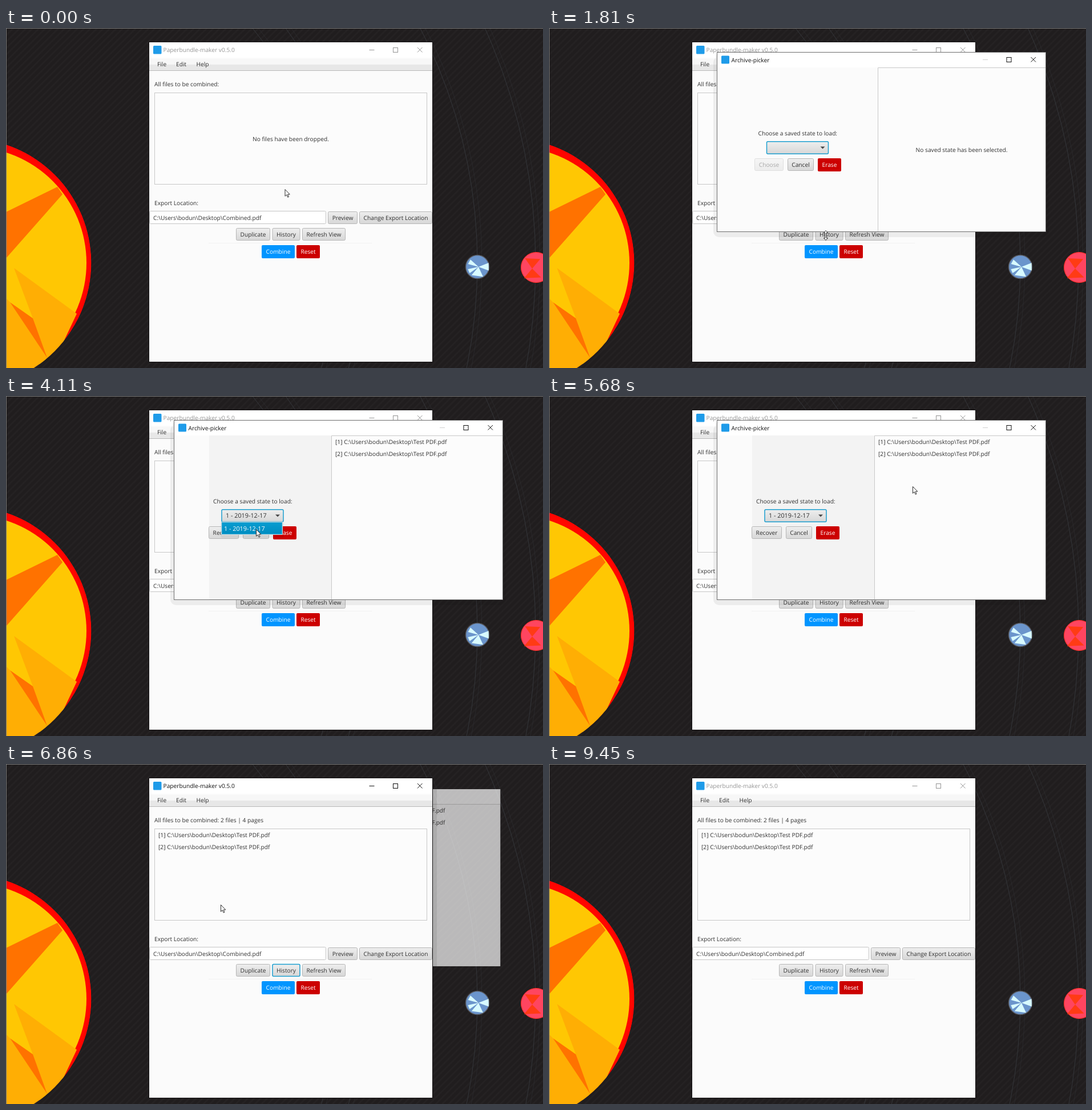
Animation of 941x595 px, one loop 9.55 s. Source, as an HTML page:

```html
<!DOCTYPE html>
<html lang="en">
<head>
<meta charset="utf-8">
<title>File bundling demo</title>
<style>
html, body { margin: 0; width: 100%; height: 100%; overflow: hidden; background: #211e1f; }
svg { display: block; width: 941px; height: 595px; }
text { font: 10.2px "Open Sans", "Noto Sans", sans-serif; fill: #303030; white-space: pre; text-rendering: geometricPrecision; }
.date { font-size: 10.8px; }
.mid { text-anchor: middle; }
.light text { fill: #fff; }
.off { opacity: .4; }
.btn rect { fill: url(#face); stroke: #b6b6b6; }
.btn.hover rect { fill: url(#bright); }
.btn.focus rect { stroke: #1c9fd0; stroke-width: 1.5; }
.list { fill: #fcfcfc; stroke: #c8c8c8; }
.glyph { fill: none; stroke: currentColor; }
.frame { fill: #fbfbfb; stroke: #6d6d6d; }
.fading .frame { stroke: none; }
</style>
</head>
<body>
<svg id="stage" viewBox="0 0 941 595"></svg>
<script>
const LOOP = 9550;
const USER = String.raw`C:\Users\bodun\Desktop` + '\\';
const DATE = '1 - 2019-12-17';
const BLUE = '#0095ff', RED = '#cc0000';

const pen = document.createElement('canvas').getContext('2d');
pen.font = '10.2px "Open Sans", "Noto Sans", sans-serif';

const text = (x, y, s, attrs = '') => `<text x="${x}" y="${y}" ${attrs}>${s}</text>`;
const mid = (x, y, s) => text(x, y, s, 'class="mid"');
const box = (x, y, w, h, attrs = '') => `<rect x="${x}" y="${y}" width="${w}" height="${h}" ${attrs}/>`;
const poly = (points, fill) => `<polygon points="${points}" fill="${fill}"/>`;
const disc = (x, y, r, attrs = '') => `<circle cx="${x}" cy="${y}" r="${r}" ${attrs}/>`;
const orbit = r => disc(-71, 412, r);

// A centred row of buttons, each as wide as its label plus padding
function row(cx, y, gap, items) {
  const widths = items.map(b => Math.round(pen.measureText(b.label).width + 15));
  let x = Math.round(cx - (widths.reduce((a, b) => a + b) + gap * (items.length - 1)) / 2);
  return items.map(({ label, fill, id, cls = '' }, i) => {
    const w = widths[i], left = x;
    x += w + gap;
    const name = id ? `id="${id}"` : '';
    return fill
      ? `<g class="light">${box(left, y, w, 23, `rx="2" fill="${fill}"`)}${mid(left + w / 2, y + 14.9, label)}</g>`
      : `<g class="btn ${cls}" ${name}>${box(left + .5, y + .5, w - 1, 21, 'rx="2"')}${mid(left + w / 2, y + 14.7, label)}</g>`;
  }).join('');
}

const fileRows = (x, y) => [1, 2].map(n =>
  text(x, y + (n - 1) * 20.8, `[${n}] ${USER}Test PDF.pdf`)).join('');

const winGlyphs = (x, y, minColor = 'currentColor') => `<g class="glyph">
  <path d="M${x - 4.5} ${y + .5}h9" stroke="${minColor}"/>${box(x + 37.5, y - 3.5, 8, 8)}
  <path d="M${x + 80} ${y - 4}l8.5 8.5m0-8.5l-8.5 8.5"/></g>`;

const logo = (x, y, size) => box(x, y, size, size, 'rx="1.5" fill="#1e9be9"');

// Left half of the dialog is centred on cx, the list starts at edge
const chooser = (cx, edge, value, list, buttons) => `
  <path d="M${edge + .5} 356V69.5H870" class="list"/>${box(edge + 1, 70, 869 - edge, 286, 'fill="#fcfcfc"')}${list}
  ${mid(cx + .3, 187.5, 'Choose a saved state to load:')}
  ${box(cx - 54, 198.7, 108, 21.6, 'rx="2" fill="url(#face)" stroke="#1c9fd0" stroke-width="1.5"')}
  <path d="M${cx + 40} 207.5h8l-4 4z" fill="#444"/>${text(cx - 47, 213, value, 'class="date"')}
  ${row(cx, 228, 7, buttons)}`;

// Pale wedges of a planet, from an inner point to the rim, in degrees
const wedges = (x, y, r, fill, ...spans) => spans.map(([from, to]) =>
  poly([[x, y], ...[from, to].map(a => a * Math.PI / 180)
    .map(a => [x + r * Math.cos(a), y + r * Math.sin(a)])].join(' '), fill)).join('');

const gradient = (id, ...colors) => `<linearGradient id="${id}" x2="0" y2="1">${colors.map((c, i) =>
  `<stop offset="${i / (colors.length - 1)}" stop-color="${c}"/>`).join('')}</linearGradient>`;

const defs = `<defs>
  ${gradient('face', '#eeeeee', '#d7d7d7')}${gradient('bright', '#f8f8f8', '#e4e4e4')}${gradient('pick', '#079cd0', '#008cc0')}
  <pattern id="stripes" width="8" height="8" patternUnits="userSpaceOnUse" patternTransform="rotate(45)">
    ${box(0, 0, 8, 8, 'fill="#201d1e"')}${box(0, 0, 2.5, 8, 'fill="#252223"')}</pattern>
  <clipPath id="sunEdge">${disc(-68.5, 411, 218)}</clipPath>
  <clipPath id="besideMain">${box(748, 0, 193, 595)}</clipPath>
</defs>`;

const backdrop = `${box(0, 0, 941, 595, 'fill="url(#stripes)"')}
<g fill="none" stroke="#34363a">${[650, 696, 897, 999].map(r => orbit(r) + `<g opacity=".45">${orbit(r + 8)}</g>`).join('')}</g>
<g clip-path="url(#sunEdge)">
  ${disc(-68.5, 411, 218, 'fill="#ff0500"')}${disc(-62, 411, 203, 'fill="#ffc703"')}
  ${poly('0,322 90,278 99,291 0,403', '#ff7200')}
  ${poly('14,420 124,500 99,553 60,595 47,508', '#ffae04')}
  ${poly('0,473 7,480 72,577 52,600 0,600', '#ffae04')}
  ${poly('7,480 47,508 72,577', '#ff7200')}
</g>
${disc(826, 418, 20.5, 'fill="#6b95cc" stroke="#56575c" stroke-width="1.5"')}
${wedges(828, 418, 19, '#d8faff', [195, 222], [-22, 20], [145, 168], [65, 130])}
${disc(929, 419, 26.5, 'fill="#ff4560" stroke="#ff2c20"')}
${wedges(922, 421, 22, '#ff3b14', [45, 130], [235, 310])}
<path d="M0 .5H941M.5 0V595" stroke="#777"/>`;

const mainWin = `${box(250, 24, 498, 561, 'fill="#151314"')}
${box(251, 25, 496, 559, 'fill="#fbfbfb"')}${box(251, 25, 496, 27, 'fill="#fff"')}${logo(258, 31, 14.5)}
<g id="mainBar">${text(275.5, 42, 'Paperbundle-maker v0.5.0', 'style="fill:currentColor"')}${winGlyphs(641, 38)}</g>
${box(251, 54, 496, 10, 'fill="#f7f7f7"')}${box(251, 64, 496, 10, 'fill="#e7e7e7"')}${box(251, 74, 496, 1, 'fill="#b9b9b9"')}
${text(265, 67, 'File')}${text(298, 67, 'Edit')}${text(333.5, 67, 'Help')}
${text(260, 102, 'All files to be combined:<tspan id="count"> 2 files | 4 pages</tspan>')}
${box(260.5, 113.5, 477, 160, 'class="list"')}
<g id="empty">${mid(499, 197.5, 'No files have been dropped.')}</g>
<g id="files">${fileRows(267, 128)}</g>
${text(260, 310, 'Export Location:')}
${box(251.5, 320.5, 309, 22, 'rx="2" fill="#fff" stroke="#c4c4c4"')}${text(258, 335.5, USER + 'Combined.pdf')}
${row(655.5, 321, 3, [{ label: 'Preview' }, { label: 'Change Export Location' }])}
${row(499, 350, 3.5, [{ label: 'Duplicate' }, { label: 'History', id: 'history' }, { label: 'Refresh View' }])}
${box(355, 376, 286, 1, 'fill="#f1f1f1"')}
${row(499, 380, 3, [{ label: 'Combine', fill: BLUE }, { label: 'Reset', fill: RED }])}`;

const dialog = `<g id="clip"><g id="dialog">
<g id="shade" opacity=".055">${box(288, 50, 588, 316, 'rx="10"')}${box(292, 44, 581, 317, 'rx="6"')}</g>
${box(294.5, 42.5, 576, 314, 'class="frame"')}${box(295, 43, 575, 26, 'fill="#fff"')}${logo(302, 48.5, 14)}
${text(319.5, 59.5, 'Archive-picker', 'style="fill:#111"')}
<g id="dialogBar" color="#111">${winGlyphs(764.5, 55, '#d0d0d0')}</g>
<g id="blank">${chooser(435.5, 576, '', mid(723, 217, 'No saved state has been selected.'),
    [{ label: 'Choose', cls: 'off' }, { label: 'Cancel' }, { label: 'Erase', fill: RED }])}</g>
<g id="chosen">${box(356, 69, 214, 287, 'fill="#f3f3f3"')}${chooser(432, 570, DATE, fileRows(577, 84),
    [{ label: 'Recover', id: 'recover' }, { label: 'Cancel' }, { label: 'Erase', fill: RED }])}</g>
<g id="popup">
  ${box(376, 221, 111, 27, 'rx="3" opacity=".05"')}${box(377.5, 220.5, 107, 22, 'fill="#fff" stroke="#c6d9e0"')}
  <g id="cell">${box(378.5, 221.5, 105, 20, 'id="pickFill" fill="url(#pick)" stroke="#27a8d6"')}${text(382, 235.5, DATE, 'class="date"')}</g>
</g></g>
<g id="edgeShade">${box(747, 44, 8, 310, 'opacity=".08"')}</g></g>`;

const pointer = `<g id="pointer" fill="#fff" stroke="#222" stroke-width=".95">
  <g id="click">${disc(0, 2, 7.5, 'fill="#888" fill-opacity=".15"')}</g>
  <path id="arrow" d="M.5 .5V12.3L3.2 9.8L5.2 14.2L7 13.4L5.1 9.1H8.8Z"/>
  <path id="sizer" d="M0-6.5l3.6 4H1.2v9h2.4L0 10.5l-3.6-4h2.4v-9h-2.4Z"/>
</g>`;

document.getElementById('stage').innerHTML = defs + backdrop + mainWin + dialog + pointer;

// Each move runs from the previous end through its key points
const home = [488.5, 282];
const moves = [
  { from: 150, to: 1080, steps: 8, via: [[485, 361]] },
  { from: 1921, to: 2470, steps: 5, via: [[437, 211]] },
  { from: 2793, to: 3140, steps: 3, via: [[438, 233]] },
  { from: 4540, to: 5680, steps: 9, via: [[642, 45], [637, 158]] },
  { from: 5830, to: 6370, steps: 5, via: [[420, 260], [376, 246]] },
  { from: 7290, to: 8250, steps: 8, via: [[326, 140], [436, 126], [361, 127]] },
  { from: 8400, to: 9180, steps: 7, via: [[960, 620]] }
];
const ease = u => u * u * (3 - 2 * u);

function spline(pts, u) {
  const s = u * (pts.length - 1), i = Math.min(Math.floor(s), pts.length - 2), f = s - i;
  const at = n => pts[Math.max(0, Math.min(pts.length - 1, n))];
  const [a, b, c, d] = [i - 1, i, i + 1, i + 2].map(at);
  return [0, 1].map(k => b[k] + f / 2 * (c[k] - a[k]
    + f * (2 * a[k] - 5 * b[k] + 4 * c[k] - d[k] + f * (3 * (b[k] - c[k]) + d[k] - a[k]))));
}

function pointerAt(t) {
  let at = home;
  for (const { from, to, steps, via } of moves) {
    if (t < from) break;
    const step = Math.min(steps, 1 + Math.floor((t - from) / (to - from) * (steps - 1)));
    at = spline([at, ...via], ease(step / steps));
  }
  return at;
}

const el = {};
document.querySelectorAll('#stage [id]').forEach(n => el[n.id] = n);
const show = (id, on) => { el[id].style.display = on ? '' : 'none'; };

function draw(t) {
  const within = (a, b) => t >= a && t < b;
  const loaded = t >= 6860;
  const chosen = t >= 4110;
  const closing = within(6860, 7010);
  const partial = within(1660, 1810) || closing;
  const active = within(150, 1660) || within(6860, 9450);

  el.mainBar.setAttribute('color', active ? '#111' : '#959595');
  show('count', loaded);
  show('files', loaded);
  show('empty', !loaded);
  el.history.classList.toggle('focus', within(1510, 1660) || within(6860, 9450));
  el.history.classList.toggle('hover', within(1000, 1510));

  show('clip', within(1660, 7010));
  el.clip.setAttribute('clip-path', closing ? 'url(#besideMain)' : 'none');
  el.dialog.setAttribute('opacity', partial ? .7 : 1);
  el.dialog.setAttribute('transform', partial ? 'translate(582 198.5) scale(.987) translate(-582.5 -199)' : '');
  el.dialog.classList.toggle('fading', partial);
  show('shade', !partial);
  show('edgeShade', closing);
  show('dialogBar', !closing);
  show('blank', !chosen);
  show('chosen', chosen);
  el.recover.classList.toggle('hover', within(6230, 6860));

  const hot = t >= 2960;
  show('popup', within(2790, 4260));
  el.popup.setAttribute('transform', chosen ? '' : 'translate(4 0)');
  show('pickFill', hot);
  el.cell.classList.toggle('light', hot);

  const sizing = within(1810, 1921);
  el.pointer.setAttribute('transform', `translate(${pointerAt(t)})`);
  show('pointer', t < 9180);
  show('arrow', !sizing);
  show('sizer', sizing);
  show('click', within(1510, 1660) || within(2620, 2790) || within(6740, 6860));
}

const start = performance.now();
function tick() {
  draw((performance.now() - start) % LOOP);
  requestAnimationFrame(tick);
}
tick();
</script>
</body>
</html>
```
